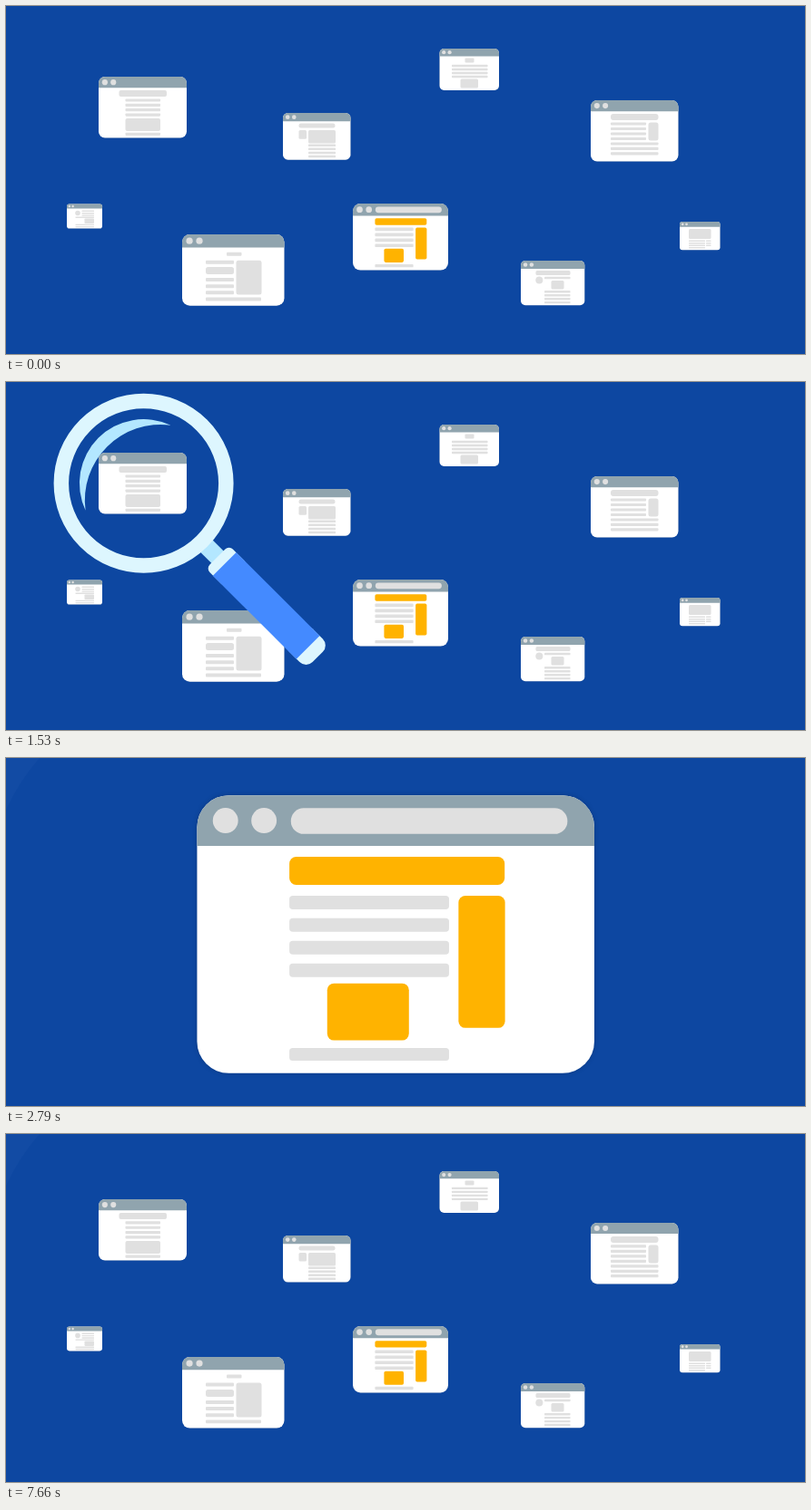
An HTML page that plays this animation: 880 px wide and 384 px high, repeating every 7.69 s.

```html
<!DOCTYPE html>
<html lang="en">
<head>
<meta charset="utf-8">
<title>Finding your website</title>
<style>
  html, body { margin: 0; width: 100%; height: 100%; overflow: hidden; background: #0d47a1; }
  svg { display: block; width: 100vw; height: 100vh; }
  .win { filter: drop-shadow(0 .8px .7px rgba(0, 0, 0, .2)); }
  .soft { fill: #e0e0e0; }
  .gold { fill: #ffb300; }
  .head { fill: #90a4ae; }
  .rim { fill: #ddf6fe; }
  .shine { fill: #b3e7ff; }
  text { font: 500 21.5px Roboto, sans-serif; fill: #90a4ae; text-anchor: middle; }
</style>
</head>
<body>
<svg viewBox="0 0 880 384">
  <defs><clipPath id="glass"><circle id="hole"/></clipPath></defs>
  <rect width="880" height="384" fill="#0d47a1"/>
  <path id="corner" d="M0 0H37Q15 25 0 57Z" fill="#124ba4"/>
  <g id="scene"></g>
  <g clip-path="url(#glass)"><g id="hero"></g></g>
  <g id="lens">
    <g transform="rotate(45)">
      <rect class="shine" x="95" y="-9.5" width="25" height="19"/>
      <rect class="rim" x="115" y="-18" width="30" height="36" rx="6"/>
      <rect class="rim" x="235" y="-18" width="36" height="36" rx="10"/>
      <rect x="126" y="-18.2" width="130" height="36.4" fill="#448aff"/>
    </g>
    <circle r="90.75" fill="none" stroke="#ddf6fe" stroke-width="16.5"/>
    <path class="shine" d="M30-64A70.7 70.7 0 0 0-64 30A83.5 83.5 0 0 1 30-64Z"/>
  </g>
</svg>
<script>
const LOOP = 7690, STEP = 30, DROP = 7360;
const $ = id => document.getElementById(id);

// Drawing helpers
const box = (x, y, w, h, r = 1.5, cls = 'soft') =>
  `<rect class="${cls}" x="${x}" y="${y}" width="${w}" height="${h}" rx="${r}"/>`;
const dot = (x, y, r) => `<circle class="soft" cx="${x}" cy="${y}" r="${r}"/>`;
const rows = (x, w, first, step, n, thick) =>
  Array.from({ length: n }, (_, i) => box(x, first + i * step - thick / 2, w, thick, thick / 4)).join('');

function frame(x, y, w, h, r, bar, content) {
  const d = `M${x} ${y + bar}v${r - bar}a${r} ${r} 0 0 1 ${r}-${r}h${w - 2 * r}a${r} ${r} 0 0 1 ${r} ${r}v${bar - r}z`;
  const cy = y + bar * .5;
  return `<g class="win"><rect x="${x}" y="${y}" width="${w}" height="${h}" rx="${r}" fill="#fff"/><path class="head" d="${d}"/>`
    + dot(x + bar * .56, cy, bar * .25) + dot(x + bar * 1.32, cy, bar * .25) + content + '</g>';
}

const oldPage = box(406.4, 234.3, 56.9, 7.4, 1.8, 'gold') + rows(406.4, 42.2, 246.4, 5.97, 4, 3.6)
  + box(416.4, 267.8, 21.6, 15.1, 1.8, 'gold') + rows(406.4, 42.2, 286.6, 0, 1, 3.4)
  + box(451.1, 244.6, 12.3, 35, 1.8, 'gold');
const newPage = '<text x="429" y="134">Your Website</text>' + box(300, 152, 258, 86, 3, 'gold')
  + [256.5, 283.5, 310.5].map(y => box(330, y, 198, 16, 4, 'gold')).join('');
const cursor = '<path d="M406 287V336L417 328L427 351L435.500 347L426 324.500L441 321Z" fill="#231815"'
  + ' stroke="#fff" stroke-width="6" paint-order="stroke"/>';
const mainWindow = page => frame(382, 218, 105, 73.6, 8.4, 13.4, box(406.8, 221.4, 73.1, 6.85, 3.4) + page);

// Each window flies to (toX, toY) at size `grow` while the view dives in
const windows = [];
function addWindow(x, y, w, h, r, bar, toX, toY, grow, content) {
  $('scene').insertAdjacentHTML('beforeend', `<g>${frame(x, y, w, h, r, bar, content)}</g>`);
  windows.push({ el: $('scene').lastElementChild, cx: x + w / 2, cy: y + h / 2, toX, toY, grow });
}

addWindow(102, 78, 97, 67.6, 7, 12.3, -55, 26.5, 2.8,
  box(124.5, 93, 52.5, 7, 2) + rows(131.5, 38.5, 104, 5.35, 4, 3.2) + box(131.5, 124, 38.5, 14, 2) + rows(131.5, 38.5, 141.3, 0, 1, 3.2));
addWindow(305, 118, 74.5, 51.7, 5.5, 9.3, 206.5, 5.5, 2.77,
  box(322.5, 129.5, 40, 5, 2.2) + box(322.5, 137, 8.5, 9.7) + box(333, 137, 30, 14.5) + rows(333, 30, 153.8, 4.05, 4, 2.5));
addWindow(477.5, 47, 65.5, 46, 5, 8.4, 562, -37, 3.05,
  box(505.5, 57.5, 10, 5, 1) + rows(491, 39.5, 66, 4, 4, 2.3) + box(500.5, 80.5, 19.5, 10));
addWindow(644, 104, 96.5, 67.5, 7, 12.2, 923, 25.5, 2.8,
  box(666, 119, 52.5, 7, 3) + rows(666, 39, 130, 5.5, 4, 3.2) + rows(666, 52.5, 152, 5.4, 3, 3.2) + box(707.5, 128.5, 11, 20, 2.5));
addWindow(67, 218.5, 39, 27, 2.8, 5, -50, 233, 4.7,
  dot(79, 228.5, 2.8) + rows(83.5, 13.5, 226.3, 2.4, 3, 1.4) + rows(76.5, 20.5, 233.2, 0, 1, 1.4)
  + box(86.5, 234.5, 10.5, 5.5, .8) + rows(76.5, 20.5, 241.4, 2.2, 2, 1.4));
addWindow(194, 252, 112.5, 78.7, 8.5, 14.4, 46.5, 310, 2,
  box(243, 271.7, 16.5, 4, 1) + rows(220, 31, 282.7, 0, 1, 4) + box(220, 288, 31, 8, 2.5)
  + rows(220, 31, 302, 7.15, 3, 4) + rows(220, 61, 323.5, 0, 1, 3.8) + box(253.5, 280.7, 28, 37.8, 2.5));
addWindow(567, 281, 70.3, 49.3, 5, 9, 810, 404.5, 2.9,
  box(583.5, 292, 38, 5) + dot(587.3, 302.5, 4) + rows(593, 28.5, 300, 0, 1, 2.5)
  + box(600.5, 303, 14, 9.5) + rows(593, 28.5, 315.3, 3.95, 4, 2.4));
addWindow(742, 238, 44.5, 31.3, 3, 5.7, 908, 264, 4,
  box(752, 246, 24.5, 11) + rows(752, 18, 259.3, 2.5, 4, 1.6) + rows(771, 5.5, 259.3, 2.5, 3, 1.6));
$('scene').insertAdjacentHTML('beforeend', `<g id="small">${mainWindow(oldPage)}</g>`);
$('hero').innerHTML = mainWindow(`<g id="before">${oldPage}</g>`)
  + `<g transform="translate(382 218) scale(.24) translate(-210.5 -41)"><g id="after">${newPage}</g><g id="cursor">${cursor}</g></g>`;

// Timing helpers
const mix = (a, b, k) => a + (b - a) * k;
const span = (t, a, b) => Math.min(1, Math.max(0, (t - a) / (b - a)));
const cubicInOut = u => u < .5 ? 4 * u ** 3 : 1 - 4 * (1 - u) ** 3;
const cubicOut = u => 1 - (1 - u) ** 3;
// Cubic bezier with control points (a, 0) and (b, 1)
function bezier(a, b, u) {
  let lo = 0, hi = 1;
  for (let i = 0; i < 24; i++) {
    const s = (lo + hi) / 2, x = 3 * (1 - s) ** 2 * s * a + 3 * (1 - s) * s * s * b + s ** 3;
    x < u ? lo = s : hi = s;
  }
  return lo * lo * (3 - 2 * lo);
}

function lensAt(t) {
  const enter = bezier(.62, .78, span(t, 100, 1230));
  const seek = cubicInOut(span(t, 1450, 2166));
  const dive = span(t, 2172, 2340);
  let x = mix(990, 150, enter), y = 111 + .044 * (x - 150);
  x = mix(mix(x, 434, seek), 424, dive);
  y = mix(mix(y, 246, seek), 212, dive);
  const scale = Math.exp(1.554 * dive) + span(t, 2340, 2480);
  return { x, y, scale, dive };
}

function pose(t) {
  const lens = lensAt(t);
  const lensOn = t >= 110 && t < 2480;
  $('lens').style.display = lensOn ? '' : 'none';
  if (lensOn) {
    $('lens').setAttribute('transform', `translate(${lens.x} ${lens.y}) scale(${lens.scale})`);
    $('lens').style.filter = lens.dive ? `blur(${2.2 * lens.dive}px)` : 'none';
    $('lens').style.opacity = 1 - span(t, 2350, 2480);
  }
  $('hole').setAttribute('cx', lens.x);
  $('hole').setAttribute('cy', lens.y);
  $('hole').setAttribute('r', t < 2400 ? 91 * lens.scale : 2000);

  // Final drop: the page falls away while the windows come down from above
  const dropping = t >= DROP;
  const rest = dropping ? (1 - span(t, 7320, 7691)) ** 1.67 : 1;
  const fall = 1 - rest;

  const fly = dropping ? 0 : Math.max(0, (t - 2225) / 115);
  $('scene').style.display = fly < 2.3 ? '' : 'none';
  $('scene').setAttribute('transform', `translate(0 ${dropping ? -384 * rest : 0})`);
  for (const w of windows) {
    const x = mix(w.cx, w.toX, fly), y = mix(w.cy, w.toY, fly);
    w.el.setAttribute('transform', `translate(${x} ${y}) scale(${mix(1, w.grow, fly)}) translate(${-w.cx} ${-w.cy})`);
    w.el.style.opacity = Math.max(0, 1 - .43 * fly);
  }
  $('small').style.display = fly ? 'none' : '';

  const zoom = bezier(.4, .2, span(t, 2164, 2704));
  $('hero').style.display = t >= 1450 ? '' : 'none';
  $('hero').setAttribute('transform',
    `translate(${mix(425.5, 429.2, zoom) + 6 * fall} ${mix(257, 194.5, zoom) + 453 * fall})`
    + `rotate(${-13.7 * fall}) scale(${mix(2.1, 4.167, zoom)}) translate(-434.5 -254.8)`);

  const slide = 1 - cubicOut(span(t, 2970, 3300));
  $('before').style.opacity = 1 - span(t, 2850, 3030);
  $('after').style.opacity = span(t, 2940, 3180);
  $('cursor').style.display = t >= 2970 ? '' : 'none';
  $('cursor').setAttribute('transform', `translate(${40 * slide} ${110 * slide})`);
  $('corner').style.display = t >= 2480 ? '' : 'none';
}

// Motion advances in steps of 30 ms, counted anew from the drop
function stepped(t) {
  const base = t < DROP ? 0 : DROP;
  return base + Math.floor((t - base) / STEP) * STEP;
}

const start = performance.now();
function tick(now) {
  pose(stepped(Math.max(0, now - start) % LOOP));
  requestAnimationFrame(tick);
}
pose(0);
requestAnimationFrame(tick);
</script>
</body>
</html>
```
